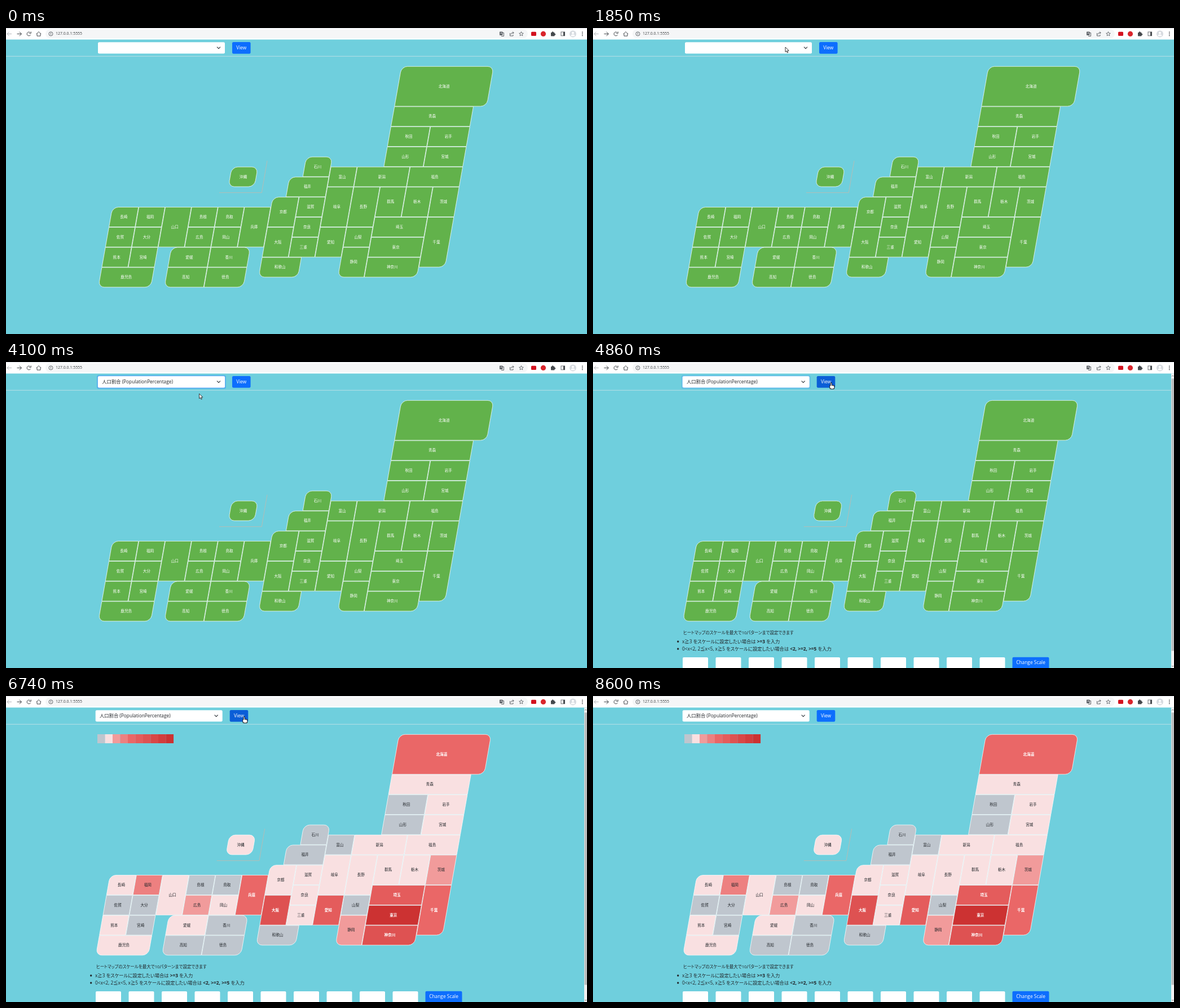
Recreate the animation shown at these times as an HTML page with a canvas. Size 1030x544 px, loop 8.8 s.

```html
<!DOCTYPE html>
<html lang="ja">
<head>
<meta charset="utf-8">
<title>Prefecture heat map</title>
<style>
html, body { margin: 0; width: 100%; height: 100%; overflow: hidden; background: #6fcfdd; }
canvas { position: absolute; left: 0; top: 0; width: 1030px; height: 544px; }
#notes { position: absolute; left: 158px; top: 475px; visibility: hidden; color: #212529; font: 8.3px/13px "Open Sans", "Noto Sans CJK JP", sans-serif; font-feature-settings: "palt"; white-space: nowrap; }
#notes .title { padding: 0 0 2px 2px; font-size: 7.5px; font-weight: 500; }
</style>
</head>
<body>
<canvas id="stage" width="1030" height="544"></canvas>
<div id="notes">
  <div class="title">ヒートマップのスケールを最大で10パターンまで設定できます</div>
  <div>x≧3 をスケールに設定したい場合は <b>&gt;=3</b> を入力</div>
  <div>0&lt;x&lt;2, 2≦x&lt;5, x≧5 をスケールに設定したい場合は <b>&lt;2, &gt;=2, &gt;=5</b> を入力</div>
</div>
<script>
const ctx = document.getElementById("stage").getContext("2d");
const notes = document.getElementById("notes");
const W = 1030, H = 544, LOOP = 8800, STEP = 69;
const OPEN = 2120, PICK = 3570, CLICK = 4790, RESULT = 4860, HEAT = 6740;
const SEA = "#6fcfdd", BLUE = "#0d6efd", INK = "#212529", ICON = "#5f6368", DARK = "#45494d";
const UI = '"Open Sans", "Noto Sans CJK JP", sans-serif';

// Sheared grid: columns count leftwards from the east edge, rows downwards.
const COL = 23.42, ROW = 17.87, EAST = 810, TOP = 68, SHEAR = Math.tan(Math.PI / 18), PIVOT = 246.7;

// Each stack starts at (column, row) and flows right, then down at every "/".
const STACKS = [
  [6, 0, "北海道/青森/秋田 岩手/山形 宮城"], [6, 12, "群馬 栃木 茨城/埼玉 千葉/東京/神奈川"],
  [8, 10, "新潟 福島"], [8, 12, "長野/山梨/静岡"], [10, 10, "富山/岐阜/愛知"], [12, 9, "石川"],
  [13, 11, "福井"], [12, 13, "滋賀/奈良/三重"], [14, 13, "京都/大阪/和歌山"], [16, 14, "兵庫"],
  [20, 14, "島根 鳥取/広島 岡山"], [22, 14, "山口"], [26, 14, "長崎 福岡/佐賀 大分/熊本 宮崎/鹿児島"],
  [21, 18, "愛媛 香川/高知 徳島"], [17.5, 10, "沖縄"]
];
const WIDTHS = { 3: "秋田 岩手 山形 宮城 福井 和歌山 愛媛 香川 高知 徳島", 4: "新潟 福島 埼玉 東京 神奈川 鹿児島", 6: "青森", 7: "北海道" };
const HEIGHTS = { 3: "群馬 栃木 茨城 京都 大阪 静岡 愛知", 4: "北海道 山口 兵庫 岐阜 長野", 5: "千葉" };
const LEVELS = { 0: "秋田 山形 石川 福井 富山 山梨 和歌山 鳥取 島根 佐賀 大分 宮崎 香川 高知 徳島",
  2: "茨城 静岡 広島", 3: "福岡", 4: "北海道 兵庫 千葉", 5: "埼玉 愛知", 6: "大阪 神奈川", 9: "東京" };
// top left, top right, bottom right, bottom left
const ROUNDED = ["北海道 石川 福井 京都 長崎 愛媛 沖縄", "北海道 石川 香川 沖縄",
  "北海道 千葉 神奈川 和歌山 鹿児島 徳島 沖縄", "静岡 和歌山 鹿児島 高知 沖縄"];

const mix = (a, b, p) => a + (b - a) * p;
const has = (list, name) => list.split(" ").includes(name);
const lookup = (groups, name, fallback) => +(Object.keys(groups).find(k => has(groups[k], name)) ?? fallback);
const lean = y => (PIVOT - y) * SHEAR;

// Grey and pale tints first, then an even ramp of reds.
function heatColor(level) {
  if (level < 4) return ["#bfc6ce", "#f9e0e1", "#f19b9b", "#ed8080"][level];
  const p = (level - 4) / 5, dim = mix(103, 50, p);
  return `rgb(${mix(234, 204, p)},${dim},${dim})`;
}

const cells = [];
for (const [left, top, text] of STACKS) {
  let row = top;
  for (const names of text.split("/").map(s => s.split(" "))) {
    let col = left;
    for (const name of names) {
      const w = lookup(WIDTHS, name, 2), h = lookup(HEIGHTS, name, 2);
      cells.push({ name, x: EAST - col * COL, y: TOP + row * ROW, w: w * COL, h: h * ROW,
        level: lookup(LEVELS, name, 1), radii: ROUNDED.map(list => has(list, name) ? 10.5 : 0) });
      col -= w;
    }
    row += lookup(HEIGHTS, names[0], 2);
  }
}

function box(x, y, w, h, fill, r = 0) {
  ctx.fillStyle = fill;
  ctx.beginPath();
  ctx.roundRect(x, y, w, h, r);
  ctx.fill();
}
function line(points, color, width = 1, closed = false, fill) {
  ctx.beginPath();
  points.forEach(([x, y]) => ctx.lineTo(x, y));
  if (closed) ctx.closePath();
  if (fill) { ctx.fillStyle = fill; ctx.fill(); }
  ctx.strokeStyle = color;
  ctx.lineWidth = width;
  ctx.stroke();
}
function chevron(x, y, dx, dy, color, width) {
  const side = s => dx ? [x - dx, y + s * Math.abs(dx)] : [x + s * Math.abs(dy), y - dy];
  line([side(-1), [x, y], side(1)], color, width);
}
function disc(x, y, r, fill) {
  ctx.fillStyle = fill;
  ctx.beginPath();
  ctx.arc(x, y, r, 0, 7);
  ctx.fill();
}
function ring(x, y, r, color, from = 0, to = 7) {
  ctx.strokeStyle = color;
  ctx.lineWidth = 1;
  ctx.beginPath();
  ctx.arc(x, y, r, from, to);
  ctx.stroke();
}
function label(text, x, y, color, size = 8.3, align = "left", weight = 400) {
  ctx.font = `${weight} ${size}px ${UI}`;
  ctx.textAlign = align;
  ctx.textBaseline = "middle";
  ctx.fillStyle = color;
  ctx.fillText(text, x, y);
}
function button(text, x, y, w, h, fill) {
  box(x, y, w, h, fill, 2.3);
  label(text, x + w / 2, y + 10.6, "#fff", 8.4, "center");
}

// Pointer travel: start time, number of steps, resting point, sideways bend.
const ENTRY = [1030, 523];
const MOVES = [
  [260, 13, [714, 195], 0.1],
  [1160, 11, [341, 34], 0],
  [OPEN, 8, [331, 58], 0],
  [4100, 8, [422, 37], 0.05],
  [7140, 12, [438, 57], -13],
  [8110, 8, [1010, 22], 0.6]
];
function pointer(t) {
  if (t < MOVES[0][0] || t >= 8600) return null;
  const i = MOVES.findLastIndex(m => t >= m[0]);
  const [start, steps, [bx, by], bend] = MOVES[i];
  const [ax, ay] = i ? MOVES[i - 1][2] : ENTRY;
  const p = Math.min(1, (Math.floor((t - start) / STEP) + 1) / steps);
  const bow = 2 * p * (1 - p) * bend;
  return [mix(ax, bx, p) - bow * (by - ay), mix(ay, by, p) + bow * (bx - ax)];
}

function drawToolbar() {
  box(0, 0, W, 20.5, "#fff");
  box(0, 0, W, 1, "#e3e6ea");
  box(70, 2.5, 855, 15.5, "#f5f6f7", 7.7);
  for (const [x, dir, color] of [[6, -1, "#b4b7ba"], [23.5, 1, DARK]]) {
    line([[x - 4 * dir, 10.5], [x + 4 * dir, 10.5]], color);
    chevron(x + 4 * dir, 10.5, 3.7 * dir, 0, color, 1);
  }
  ring(40.5, 10.5, 3.4, DARK, 0.4, 5.5);
  line([[44.3, 6.5], [44.3, 9.4], [41.2, 9.4]], DARK);
  chevron(58, 6.6, 0, -4.2, DARK, 1);
  line([[55, 9.6], [55, 14.2], [61, 14.2], [61, 9.6]], DARK);
  ring(79.5, 10.4, 3.5, ICON);
  label("i", 79.5, 10.5, ICON, 6, "center", 700);
  label("127.0.0.1:5555", 88, 10.5, "#3c4043", 6.95);

  box(875, 6.5, 5.5, 6.5, ICON, 0.8);
  line([[880, 8.5], [882.5, 8.5], [882.5, 14.5], [878, 14.5]], ICON);
  label("A", 877.8, 9.9, "#fff", 4.5, "center");
  line([[893.5, 9], [893.5, 14], [899, 14], [899, 12]], ICON);
  line([[895, 11.5], [896.5, 8.8], [900, 8.5]], ICON);
  chevron(900.2, 8.5, 2.1, 0, ICON, 1);
  const star = Array.from({ length: 10 }, (_, i) => {
    const a = i * Math.PI / 5 - Math.PI / 2, r = i % 2 ? 1.8 : 4;
    return [913.5 + r * Math.cos(a), 10.6 + r * Math.sin(a)];
  });
  line(star, ICON, 0.9, true);
  box(931, 6.8, 9, 7.2, "#d3121f", 1.5);
  disc(952.5, 10.4, 4.6, "#d9252c");
  box(966, 8, 6.6, 6.5, DARK, 0.8);
  disc(969.2, 7.8, 1.5, DARK);
  disc(972.7, 11.2, 1.5, DARK);
  ctx.strokeRect(984, 7, 6.6, 6.8);
  box(988, 7, 2.8, 7, DARK);
  disc(1005, 10.4, 6, "#d7dbe0");
  disc(1005, 8.8, 2.1, "#fff");
  box(1001.6, 11.6, 6.8, 3, "#fff", [3, 3, 1, 1]);
  for (let i = -1; i <= 1; i++) disc(1021.8, 10.4 + 3 * i, 0.9, DARK);
}

function drawForm(t, shift, cursor) {
  const x = 163 + shift;
  const focus = t < OPEN ? 0 : Math.min(1, Math.max(0, 1 - (t - CLICK) / 150));
  if (focus) {
    ctx.globalAlpha = focus;
    box(x - 2, 23.2, 229, 24.6, "rgba(13,110,253,.3)", 3.5);
    box(x - 0.5, 24.7, 226, 21.6, "#86b7fe", 2.5);
    ctx.globalAlpha = 1;
  }
  box(x, 25.2, 225, 20.4, "#fff", 2.3);
  chevron(x + 214, 36.6, 0, 3, "#343a40", 1.2);
  if (t >= PICK) label("人口割合 (PopulationPercentage)", x + 7.3, 35.6, INK);

  const over = cursor && Math.abs(cursor[0] - x - 254) < 17 && Math.abs(cursor[1] - 35.5) < 10.5;
  button("View", x + 238, 25, 32.6, 20.8, over ? "#0b5ed7" : BLUE);
  return over;
}

function drawMenu(cursor) {
  ctx.save();
  ctx.shadowColor = "rgba(0,0,0,.4)";
  ctx.shadowBlur = 4;
  ctx.shadowOffsetY = 1;
  box(163, 45.5, 225, 48.3, "#59666d");
  ctx.restore();
  box(163.7, 46.2, 223.6, 46.9, "#fff");
  const active = cursor[1] >= 57 ? 1 : 0;
  ["", "人口割合 (PopulationPercentage)", "最高点 (HightestPoint)", "面積 (Area)"].forEach((text, i) => {
    const y = 45.5 + i * 11.8;
    if (i === active) box(163.7, Math.max(y, 46.2), 223.6, 11.7, "#1e90ff");
    label(text, 170.3, y + 6.2, i === active ? "#fff" : INK);
  });
}

function drawMap(heat, shift, cursor) {
  let hovered = false;
  line([[378 + shift, 292.7], [453.3 + shift, 292.7], [463 + shift, 236]], "#b3bdb7");
  for (const { name, x, y, w, h, level, radii } of cells) {
    const u = cursor ? cursor[0] - shift - lean(cursor[1]) : 0;
    const over = cursor && u > x && u < x + w && cursor[1] > y && cursor[1] < y + h;
    hovered ||= over;
    ctx.save();
    ctx.transform(1, 0, -SHEAR, 1, PIVOT * SHEAR + shift, 0);
    ctx.globalAlpha = over ? 0.8 : 1;
    box(x + 0.35, y + 0.35, w - 0.7, h - 0.7, heat ? heatColor(level) : "#62b24b", radii);
    ctx.strokeStyle = "#fff";
    ctx.lineWidth = 0.7;
    ctx.stroke();
    ctx.restore();
    const mid = y + h / 2, strong = heat && level > 3;
    label(name, x + w / 2 + lean(mid) + shift, mid + 0.3, !heat || strong ? "#fff" : INK, 6.6, "center", strong ? 700 : 400);
  }
  return hovered;
}

function drawResult(heat) {
  for (let i = 0; i < 10; i++) {
    if (heat) box(162 + i * 13.5, 68, 13.6, 16, heatColor(i));
    box(159 + i * 58.5, 525, 45, 24, "#fff", 2);
  }
  for (const y of [497, 510]) disc(150.7, y, 1.7, INK);
  button("Change Scale", 743.5, 524.7, 65, 24, BLUE);
  box(1025, 20.5, 5, H, "#f1f1f1");
  box(1025.6, 29.5, 4.4, 484, "#b9bcbd");
  chevron(1027.7, 24, 0, -1.5, "#6b6b6b", 1);
  chevron(1027.7, 541.5, 0, 1.5, "#6b6b6b", 1);
}

function drawPointer([x, y], hand) {
  ctx.save();
  ctx.translate(x, y);
  ctx.lineJoin = "round";
  if (hand) {
    for (const [grow, color] of [[0.5, "#222"], [-0.4, "#fff"]]) {
      box(-0.8 - grow, -grow, 2 + 2 * grow, 8 + 2 * grow, color, 1);
      box(-2.2 - grow, 4.6 - grow, 8 + 2 * grow, 6.4 + 2 * grow, color, [1, 2, 2.5, 3]);
    }
  } else {
    line([[0, 0], [0, 8.6], [2, 6.8], [3.4, 10], [4.8, 9.4], [3.5, 6.4], [6.2, 6.2]], "#222", 0.9, true, "#fff");
  }
  ctx.restore();
}

function draw(t) {
  const result = t >= RESULT, heat = t >= HEAT, shift = result ? -4.3 : 0;
  const cursor = pointer(t);
  box(0, 0, W, H, SEA);
  drawToolbar();
  box(0, 49.7, W, 1, "#b9dfe6");
  const onMap = drawMap(heat, shift, cursor);
  const onButton = drawForm(t, shift, cursor);
  if (t >= OPEN && t < PICK) drawMenu(cursor);
  if (result) drawResult(heat);
  notes.style.visibility = result ? "visible" : "hidden";
  if (cursor) drawPointer(cursor, onMap || onButton);
}

const begin = performance.now();
function tick() {
  draw((performance.now() - begin) % LOOP);
  requestAnimationFrame(tick);
}
tick();
</script>
</body>
</html>
```
